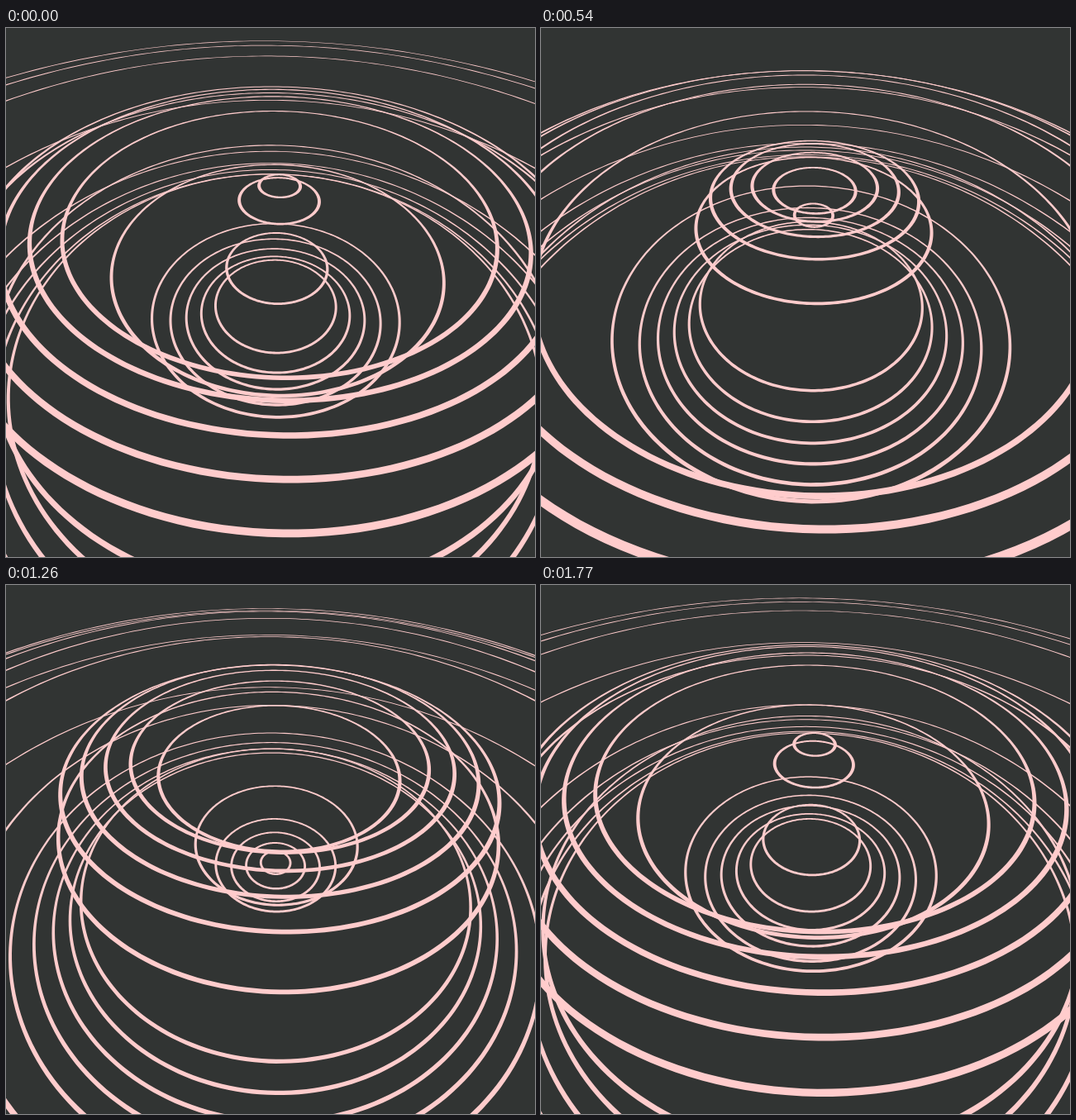
An HTML page with a canvas for the animation above (1.8 s loop, 640 by 640 pixels).

```html
<!DOCTYPE html>
<html>
<head>
<meta charset="utf-8">
<style>
html, body { margin: 0; width: 100%; height: 100%; overflow: hidden; background: #313433; }
canvas { display: block; }
</style>
</head>
<body>
<canvas id="stage" width="640" height="640"></canvas>
<script>
const ctx = document.getElementById('stage').getContext('2d');
const LOOP = 1800, STEP = 30, RINGS = 24, SEGMENTS = 240, WIDTH = 0.16;

// Camera: focal length, distance, pitch, and a slight pan and roll
const FOCAL = 432, DIST = 23.21, PITCH = 0.848, PAN = 0.0155, ROLL = 0.034;
const [sinPitch, cosPitch] = [Math.sin(PITCH), Math.cos(PITCH)];
const [sinPan, cosPan] = [Math.sin(PAN), Math.cos(PAN)];
const [sinRoll, cosRoll] = [Math.sin(ROLL), Math.cos(ROLL)];

function project(x, height, far) {
  const up = height * cosPitch + far * sinPitch;
  const depth = DIST - height * sinPitch + far * cosPitch;
  const scale = FOCAL / (depth * cosPan - x * sinPan);
  const sx = (x * cosPan + depth * sinPan) * scale;
  const sy = -up * scale;
  return [320 + sx * cosRoll - sy * sinRoll, 320 + sx * sinRoll + sy * cosRoll];
}

function circle(radius, height) {
  for (let i = 0; i < SEGMENTS; i++) {
    const a = i / SEGMENTS * 2 * Math.PI;
    const point = project(radius * Math.cos(a), height, radius * Math.sin(a));
    if (i) ctx.lineTo(...point);
    else ctx.moveTo(...point);
  }
  ctx.closePath();
}

// A sine flattened at its crests travels outwards, twelve rings per wave
function ringHeight(n, t) {
  const wave = Math.sin(2 * Math.PI * (t - (n - 2.9) / 12));
  return 3.24 + 4.78 * Math.atan(4 * wave) / Math.atan(4);
}

function draw(t) {
  ctx.fillStyle = '#313433';
  ctx.fillRect(0, 0, 640, 640);
  ctx.fillStyle = '#ffcccc';
  for (let n = 1; n <= RINGS; n++) {
    const height = ringHeight(n, t);
    ctx.beginPath();
    circle(n + WIDTH / 2, height);
    circle(n - WIDTH / 2, height);
    ctx.fill('evenodd');
  }
}

const start = performance.now();
function frame() {
  const ms = (performance.now() - start) % LOOP;
  draw(Math.floor(ms / STEP) * STEP / LOOP);
  requestAnimationFrame(frame);
}
frame();
</script>
</body>
</html>
```
